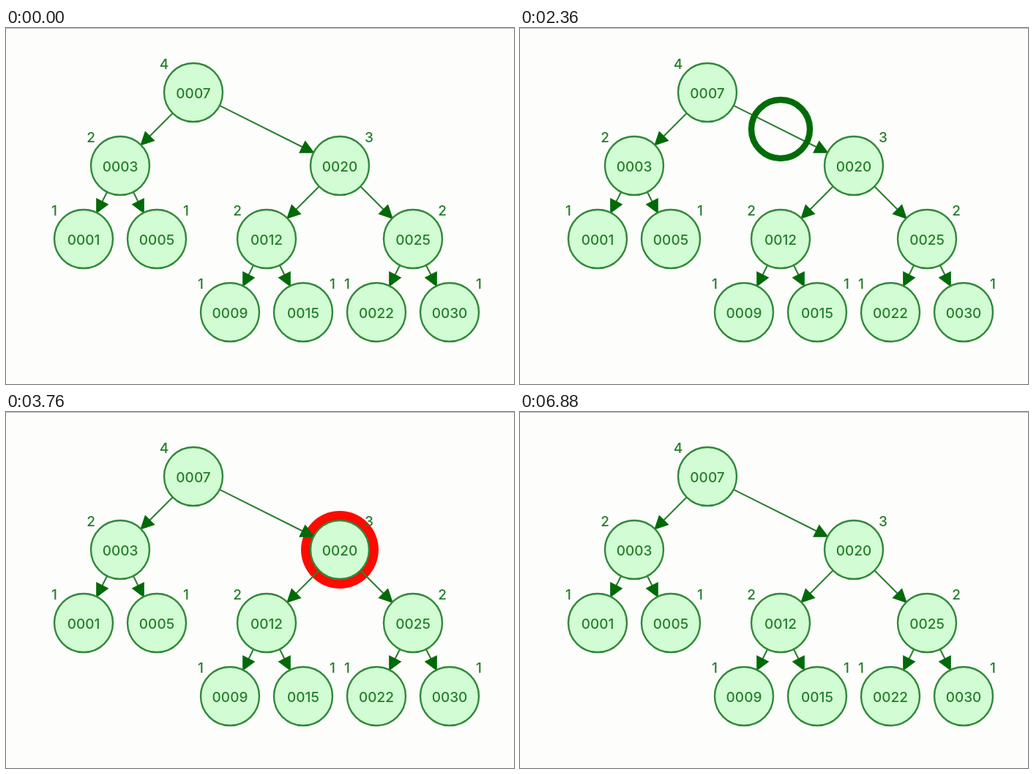
Write an HTML page that moves like this. It is 694 px wide and 486 px high and loops after 6900 ms.

```html
<!DOCTYPE html>
<html lang="en">
<head>
<meta charset="utf-8">
<title>Tree search</title>
<style>
  html, body { margin: 0; width: 100%; height: 100%; overflow: hidden; background: #fdfdfc; }
  svg { display: block; width: 694px; height: 486px; }
  text {
    font: 500 19px Inter, "Liberation Sans", sans-serif;
    fill: #237f2a;
    text-anchor: middle;
    dominant-baseline: central;
  }
  .node { fill: #d2fcd3; stroke: #32883a; stroke-width: 2.4; }
  .edge { stroke: #2c8032; stroke-width: 2.1; }
  .head { fill: #006a08; stroke: #006a08; stroke-width: 1.4; }
  #halo { fill: #ff0a00; }
  #ring { fill: none; stroke: #006c08; stroke-width: 8.4; }
</style>
</head>
<body>
<svg viewBox="0 0 694 486">
  <rect width="694" height="486" fill="#fdfdfc"/>
  <rect width="694" height="1" fill="#b4b4b4"/>
  <circle id="halo"/>
  <g id="edges"></g>
  <g id="nodes"></g>
  <g id="labels"></g>
  <circle id="ring" r="40"/>
</svg>
<script>
const LOOP = 6900, R = 40;

// key, x, y, height, side of the height label, parent index
const tree = [
  ["0007", 256, 88, 4, -1, -1],
  ["0003", 156, 188, 2, -1, 0],
  ["0020", 456, 188, 3, 1, 0],
  ["0001", 106, 288, 1, -1, 1],
  ["0005", 206, 288, 1, 1, 1],
  ["0012", 356, 288, 2, -1, 2],
  ["0025", 556, 288, 2, 1, 2],
  ["0009", 306, 388, 1, -1, 5],
  ["0015", 406, 388, 1, 1, 5],
  ["0022", 506, 388, 1, -1, 6],
  ["0030", 606, 388, 1, 1, 6]
].map(([key, x, y, height, side, parent]) => ({ key, x, y, height, side, parent }));

const byId = id => document.getElementById(id);
const halo = byId("halo"), ring = byId("ring");

function set(el, attrs) {
  for (const name in attrs) el.setAttribute(name, attrs[name]);
}

function add(layer, tag, attrs, text) {
  const el = document.createElementNS("http://www.w3.org/2000/svg", tag);
  set(el, attrs);
  if (text !== undefined) el.textContent = text;
  byId(layer).append(el);
}

function addEdge(a, b) {
  const d = Math.hypot(b.x - a.x, b.y - a.y);
  const ux = (b.x - a.x) / d, uy = (b.y - a.y) / d;
  const tipX = b.x - ux * R, tipY = b.y - uy * R;
  const baseX = tipX - ux * 17, baseY = tipY - uy * 17;
  add("edges", "line", { class: "edge", x1: a.x + ux * R, y1: a.y + uy * R, x2: baseX, y2: baseY });
  const corner = s => `${baseX - s * uy * 8.5},${baseY + s * ux * 8.5}`;
  add("edges", "polygon", { class: "head", points: `${tipX},${tipY} ${corner(1)} ${corner(-1)}` });
}

for (const n of tree) {
  if (n.parent >= 0) addEdge(tree[n.parent], n);
  add("nodes", "circle", { class: "node", cx: n.x, cy: n.y, r: R });
  add("nodes", "text", { x: n.x, y: n.y + 1 }, n.key);
  add("labels", "text", { x: n.x + n.side * R, y: n.y - 38.5 }, n.height);
}

// Ticks come in threes that last 20, 100 and 20 ms.
function tickAt(ms) {
  const rest = ms % 140;
  return Math.floor(ms / 140) * 3 + (rest < 20 ? 0 : rest < 120 ? 1 : 2);
}

// Search steps in ticks
const START = 2, LEAVE = 36, ARRIVE = 67, END = 101;
const travel = [[LEAVE, 0], [50, 0.5], [62, 0.857], [ARRIVE, 1]];

function progress(tick) {
  const i = travel.findIndex(p => p[0] > tick);
  const [t0, v0] = travel[i - 1], [t1, v1] = travel[i];
  return v0 + (v1 - v0) * (tick - t0) / (t1 - t0);
}

// Triangle wave between 6 and 14 pixels
function pulse(tick) {
  const phase = ((tick - 7) / 37.7 + 1) % 1;
  return 6 + 16 * Math.abs(phase - 0.5);
}

function show(el, on) {
  el.style.display = on ? "" : "none";
}

function draw(ms) {
  const tick = tickAt(ms), from = tree[0], to = tree[2];
  const moving = tick >= LEAVE && tick < ARRIVE;
  const lit = tick >= START && tick < END && !moving;
  show(ring, moving);
  show(halo, lit);
  if (moving) {
    const p = progress(tick);
    set(ring, { cx: from.x + (to.x - from.x) * p, cy: from.y + (to.y - from.y) * p });
  }
  if (lit) {
    const n = tick < LEAVE ? from : to;
    set(halo, { cx: n.x, cy: n.y, r: R + pulse(tick) });
  }
}

const begin = performance.now();
function frame() {
  draw((performance.now() - begin) % LOOP);
  requestAnimationFrame(frame);
}
frame();
</script>
</body>
</html>
```
